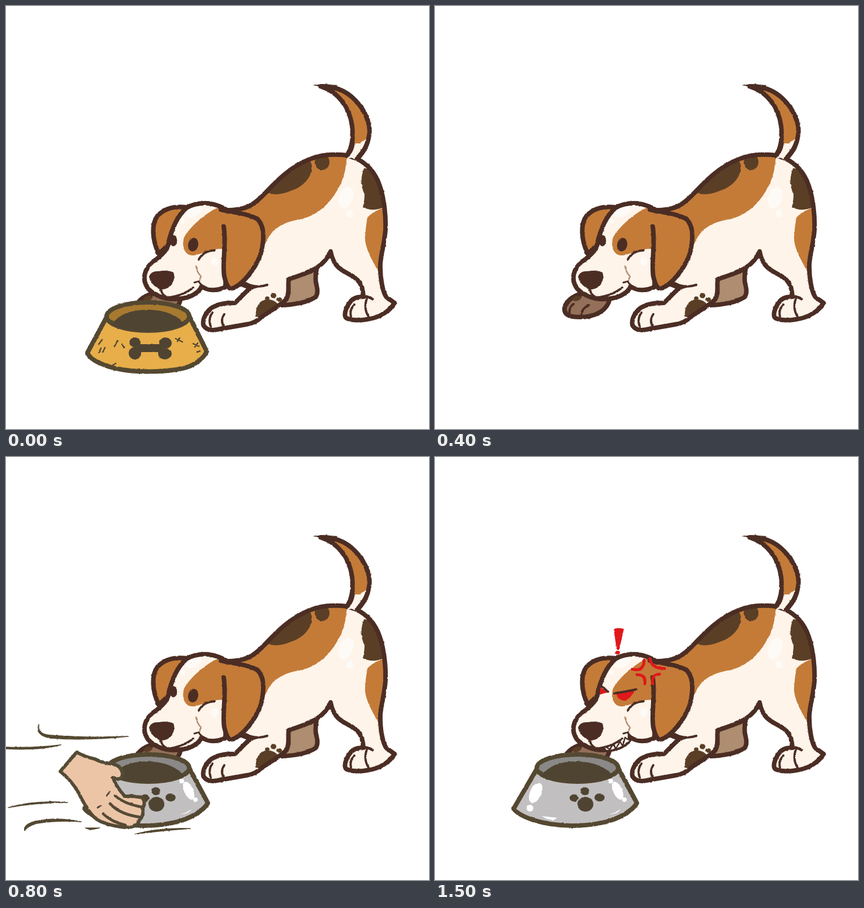
Recreate the animation shown at these times as an HTML page. Size 748 by 748 pixels, loop 1.6 s.

```html
<!DOCTYPE html>
<html lang="en">
<head>
<meta charset="utf-8">
<title>Puppy and bowl</title>
<style>
  html, body { margin: 0; width: 100%; height: 100%; overflow: hidden; background: #fff; }
  svg { display: block; width: 100vw; height: 100vh; }
  path, ellipse { stroke-linecap: round; stroke-linejoin: round; }
  .ink { stroke: #4b2d24; stroke-width: 8; }
  .thin { fill: none; stroke: #4b2d24; stroke-width: 4; }
  .cream { fill: #fef4ea; }
  .tan { fill: #c47b38; }
  .dark { fill: #5a3f26; }
  .eye { fill: #4b2d24; }
  .shade { fill: #ae8d71; }
  .paw { fill: #94705a; }
  .glow { fill: #fefbf7; }
  .rim { stroke: #544831; stroke-width: 8; }
  .hole { fill: #4f4432; }
  .gold { fill: #e7ae4a; }
  .steel { fill: #c2bfc0; }
  .mark { fill: none; stroke: #544831; stroke-width: 2.5; }
  .shine { fill: #fff; }
  .skin { fill: #ecc5a7; stroke: #544a35; stroke-width: 6; }
  .fold { fill: none; stroke: #544a35; stroke-width: 5; }
  .dash { fill: #544831; stroke: #544831; stroke-width: 1.5; }
  .red { fill: #e0181a; }
  .vein { fill: none; stroke: #e0181a; stroke-width: 5; }
</style>
</head>
<body>
<svg viewBox="0 0 748 748" xmlns="http://www.w3.org/2000/svg">
  <defs>
    <filter id="rough" filterUnits="userSpaceOnUse" x="0" y="0" width="748" height="748" color-interpolation-filters="sRGB">
      <feTurbulence type="fractalNoise" baseFrequency=".2" numOctaves="2" seed="4"/>
      <feDisplacementMap in="SourceGraphic" scale="2.5" xChannelSelector="R" yChannelSelector="G"/>
    </filter>
    <path id="torso" d="M380 361C424 363 438 353 462 327C488 299 513 278 548 267C567 262 585 262 603 264
      L620 270C641 280 654 297 661 318C669 342 672 372 671 396C669 421 664 434 662 455
      C661 483 667 508 673 515L687 525C680 538 662 551 639 554Q617 558 602 552
      C597 548 600 537 606 527Q612 517 622 515L632 514C631 499 628 488 615 479C600 469 580 467 574 434
      C564 458 545 469 500 483C498 496 502 507 496 518C489 527 466 540 453 549Q441 561 425 563
      L368 573Q354 574 349 564C347 553 355 539 365 533C376 526 390 525 405 525
      Q419 511 432 498L385 480Z"/>
    <path id="tail" d="M556 142C586 141 608 153 625 175C639 193 645 214 642 229C639 249 631 259 620 270L603 264
      C613 248 614 232 612 212C608 180 588 152 556 142Z"/>
    <path id="skull" d="M319 357C329 351 343 348 358 349C374 351 384 357 393 362L388 497
      Q364 508 346 496C340 509 322 518 301 518C281 520 260 511 250 498C240 482 245 464 260 452
      C276 441 285 431 287 422C291 402 300 374 319 357Z"/>
    <clipPath id="inTorso"><use href="#torso"/></clipPath>
    <clipPath id="inTail"><use href="#tail"/></clipPath>
    <clipPath id="inSkull"><use href="#skull"/></clipPath>
  </defs>

  <g filter="url(#rough)">
    <g id="dog">
      <path class="ink paw" d="M268 508C248 508 232 521 229 534Q228 546 242 549C261 552 286 549 299 536Q309 526 309 514Z"/>
      <path class="dark" d="M243 517Q253 509 260 514Q256 523 245 522Z"/>
      <path class="thin" d="M245 527Q237 533 238 542M272 529Q260 535 259 544"/>
      <path class="ink shade" d="M495 484L549 466Q546 484 549 493Q553 508 547 515C533 524 512 528 488 529Z"/>

      <use href="#tail" class="cream"/>
      <path class="tan" clip-path="url(#inTail)" d="M540 130H655V228Q632 235 626 243H600Z"/>
      <use href="#tail" class="ink" fill="none"/>
      <path fill="#4b2d24" d="M542 140Q560 137 586 140L580 152Q562 143 542 140Z"/>

      <use href="#torso" class="cream"/>
      <g clip-path="url(#inTorso)">
        <path class="tan" d="M370 350L540 250H603C603 287 598 308 582 332C566 357 545 371 522 377C486 382 468 397 459 420L390 440Z"/>
        <path class="dark" d="M458 330L530 270Q541 273 541 286C540 303 526 320 503 327Q480 337 458 330Z"/>
        <ellipse class="dark" cx="559" cy="276" rx="13" ry="14"/>
        <path class="dark" d="M633 288L655 285L676 352Q652 366 631 356Q634 343 634 333C626 316 628 299 633 288Z"/>
        <path class="tan" d="M639 374Q650 361 675 355V455L658 469C648 450 634 428 635 408Q636 390 639 374Z"/>
        <path class="dark" d="M441 549C442 530 449 519 462 519C474 519 481 525 483 532L458 552Z"/>
        <ellipse class="glow" cx="601" cy="339" rx="12" ry="20" transform="rotate(20 601 339)"/>
        <ellipse class="glow" cx="608" cy="367" rx="6" ry="7"/>
      </g>
      <ellipse class="dark" cx="462" cy="517" rx="4" ry="3.500"/>
      <ellipse class="dark" cx="473" cy="512" rx="5" ry="4.500"/>
      <ellipse class="dark" cx="483" cy="519" rx="5" ry="4"/>
      <use href="#torso" class="ink" fill="none"/>
      <path class="ink" fill="none" d="M607 265Q612 263 617 267" style="stroke:#fef4ea"/>
      <path class="ink" fill="none" d="M613 240Q612 255 603 264M640 239Q634 258 621 270"/>
      <path class="thin" style="stroke-width:5" d="M622 515Q637 511 648 518"/>
      <path class="thin" d="M616 528Q607 537 610 549M638 517Q632 535 641 549M365 542Q357 553 362 567M386 545Q378 557 386 568M424 490Q443 500 462 493M434 499L445 496"/>

      <path class="ink tan" d="M320 356C297 353 279 359 268 371C257 385 258 413 270 438L286 424C291 402 300 374 320 356Z"/>
      <use href="#skull" class="cream"/>
      <g clip-path="url(#inSkull)">
        <path class="tan" d="M376 356C350 367 324 393 315 409C309 429 319 442 331 441C347 440 358 427 390 430V355Z"/>
        <ellipse class="glow" cx="332" cy="364" rx="15" ry="8" transform="rotate(-25 332 364)"/>
        <ellipse class="glow" cx="312" cy="381" rx="4" ry="5"/>
        <ellipse class="glow" cx="369" cy="452" rx="6" ry="8"/>
      </g>
      <use href="#skull" class="ink" fill="none"/>

      <g id="calm">
        <ellipse class="eye" cx="331" cy="422" rx="9" ry="12" transform="rotate(12 331 422)"/>
        <ellipse class="eye" cx="296" cy="415" rx="6.500" ry="10"/>
      </g>
      <g id="angry">
        <path class="red" d="M320 418L354 411Q345 430 333 431Q323 429 320 418ZM292 407L306 416L292 420Z"/>
        <path class="thin" d="M317 418Q337 415 356 411M293 404L306 415"/>
        <path class="shine" d="M300 513Q329 510 342 487L343 501Q329 517 303 518Z"/>
        <path class="thin" style="stroke-width:2.500" d="M301 512L309 517L315 508L320 516L327 503L332 511L336 496L342 500L342 486"/>
      </g>
      <g id="rest">
        <path class="thin" d="M341 448Q349 433 369 432"/>
        <path class="thin" style="stroke:#b58d70;stroke-width:2.500" d="M336 460Q338 472 345 478L341 488"/>
        <path class="thin" style="stroke-width:3" d="M333 489L341 487L344 492"/>
      </g>
      <g id="puff">
        <path class="cream" d="M345 482L384 482V504Q364 516 346 498Z"/>
        <path class="ink" fill="none" style="stroke-width:6" d="M346 501Q362 515 386 502"/>
        <path class="thin" d="M377 434C352 430 333 451 336 473M329 491Q341 484 346 491L339 499"/>
      </g>
      <path class="eye" d="M253 478Q257 468 270 469Q286 466 296 471C300 480 296 491 287 498Q277 504 268 499Q254 490 253 478Z"/>
      <path class="thin" d="M273 500Q276 510 284 516Q312 513 331 498"/>
      <path class="ink tan" d="M385 390C390 420 382 456 386 478Q391 499 398 500C417 495 440 466 450 440C457 414 458 391 445 377C429 367 405 366 380 360"/>
    </g>

    <g id="lines" class="dash">
      <path d="M58 473Q55 490 78 492Q140 497 217 494Q140 502 78 497Q51 492 58 473Z"/>
      <path d="M0 513Q50 515 97 509Q60 519 0 516Z"/>
      <path d="M4 620Q52 606 109 611Q52 611 4 620Z"/>
      <path d="M33 661Q30 650 52 644Q90 636 133 645Q90 642 54 648Q37 653 33 661Z"/>
      <path d="M140 656L165 656L150 659Z"/>
      <path d="M228 667Q270 655 326 657Q270 661 228 667Z"/>
    </g>

    <g id="gold">
      <path class="rim gold" d="M179 548L144 613Q148 625 172 634C215 652 296 648 325 637Q347 627 355 611L324 548Z"/>
      <ellipse class="rim" cx="251" cy="549" rx="73" ry="25" fill="#a87a30"/>
      <path class="hole" d="M187 563Q205 537 251 537Q297 538 316 563Q290 575 250 575Q207 575 187 563Z"/>
      <path class="hole" d="M231 598H279V612H231Z"/>
      <ellipse class="hole" cx="228" cy="595" rx="10" ry="9"/>
      <ellipse class="hole" cx="228" cy="614" rx="11" ry="11"/>
      <ellipse class="hole" cx="282" cy="596" rx="11" ry="10"/>
      <ellipse class="hole" cx="281" cy="615" rx="12" ry="10"/>
      <path class="mark" d="M170 590L164 598M168 605L164 613M175 604L171 612M197 592L192 602M205 598L209 604M194 632L189 635M300 588L312 594M307 587L303 593M331 597L341 602M339 596L334 603M338 612L343 610"/>
    </g>

    <g id="steel">
      <path class="rim steel" d="M182 548L139 622Q147 633 174 642C212 654 266 656 310 643Q345 631 357 612L323 548Z"/>
      <ellipse class="rim" cx="252" cy="550" rx="72" ry="24" fill="#8b8988"/>
      <path class="hole" d="M188 564Q206 538 251 538Q296 540 315 564Q290 576 250 576Q207 575 188 564Z"/>
      <ellipse class="hole" cx="266" cy="614" rx="14" ry="13"/>
      <ellipse class="hole" cx="246" cy="603" rx="8" ry="6.500"/>
      <ellipse class="hole" cx="265" cy="591" rx="8" ry="7"/>
      <ellipse class="hole" cx="291" cy="602" rx="9" ry="7"/>
      <ellipse class="shine" cx="178" cy="594" rx="10" ry="19" transform="rotate(24 178 594)"/>
      <ellipse class="shine" cx="168" cy="621" rx="6" ry="6"/>
      <ellipse class="shine" cx="323" cy="590" rx="8" ry="17" transform="rotate(-24 323 590)"/>
      <ellipse class="shine" cx="311" cy="573" rx="4" ry="4"/>
      <ellipse class="shine" cx="335" cy="606" rx="4" ry="4"/>
      <path class="shine" d="M189 635L216 638L210 642Q197 641 189 635ZM308 632Q320 629 327 623Q324 631 308 632Z"/>
    </g>

    <g id="hand">
      <path class="skin" d="M125 522L96 556Q117 573 129 595Q139 616 149 629Q159 643 174 647Q190 653 211 655Q232 655 236 642
        Q244 635 242 621Q248 608 240 602Q223 599 210 600Q195 583 189 567Q206 574 206 559Q203 546 190 543Q170 541 157 534Q139 530 125 522Z"/>
      <path class="fold" d="M193 599Q210 614 241 619M184 613Q201 632 238 637M172 631Q186 645 211 651"/>
      <path class="fold" style="stroke-width:3" d="M183 592L178 599M162 620L168 617"/>
    </g>

    <g id="bang">
      <path class="red" d="M316 304Q325 301 334 304L326 340Q323 343 321 339Z"/>
      <ellipse class="red" cx="323" cy="346" rx="4" ry="3.500"/>
    </g>
    <g id="vein" class="vein">
      <path d="M349 375Q369 381 370 359M380 357Q383 374 406 374M357 385Q374 385 371 401M385 401Q382 385 397 384"/>
    </g>
  </g>
</svg>
<script>
const STEP = 100, AWAY = -220, REACH = -110;
const ids = ['calm', 'angry', 'rest', 'puff', 'lines', 'gold', 'steel', 'hand', 'bang', 'vein'];
const part = Object.fromEntries(ids.map(id => [id, document.getElementById(id)]));

const mad = (lift, size) => ({ steel: 0, mad: true, lift, size });
// Numbers under gold, steel, hand and lines are horizontal shifts.
const steps = [
  { gold: 0 },
  { gold: 0, hand: REACH },
  { gold: 0, hand: 0 },
  { gold: AWAY, hand: AWAY, lines: 60, puff: true },
  {},
  { puff: true },
  {},
  { steel: AWAY, hand: AWAY, puff: true },
  { steel: 0, hand: 0, lines: 0 },
  { steel: 0, hand: REACH },
  { steel: 0 },
  { steel: 0, mad: true },
  mad(-11, .8),
  mad(-20, 1),
  mad(-11, .8),
  mad(0, 1)
];

const show = (id, on) => { part[id].style.display = on ? '' : 'none'; };

function pose(s) {
  for (const id of ['gold', 'steel', 'hand', 'lines']) {
    show(id, id in s);
    if (id in s) part[id].setAttribute('transform', `translate(${s[id]} 0)`);
  }
  show('calm', !s.mad);
  show('angry', s.mad);
  show('puff', s.puff);
  show('rest', !s.puff);
  show('bang', s.size);
  show('vein', s.size);
  if (s.size) {
    part.bang.setAttribute('transform', `translate(0 ${s.lift})`);
    part.vein.setAttribute('transform', `translate(378 379) scale(${s.size}) translate(-378 -379)`);
  }
}

let last = -1;
function tick() {
  const i = Math.floor(performance.now() / STEP) % steps.length;
  if (i !== last) pose(steps[last = i]);
  requestAnimationFrame(tick);
}
tick();
</script>
</body>
</html>
```
